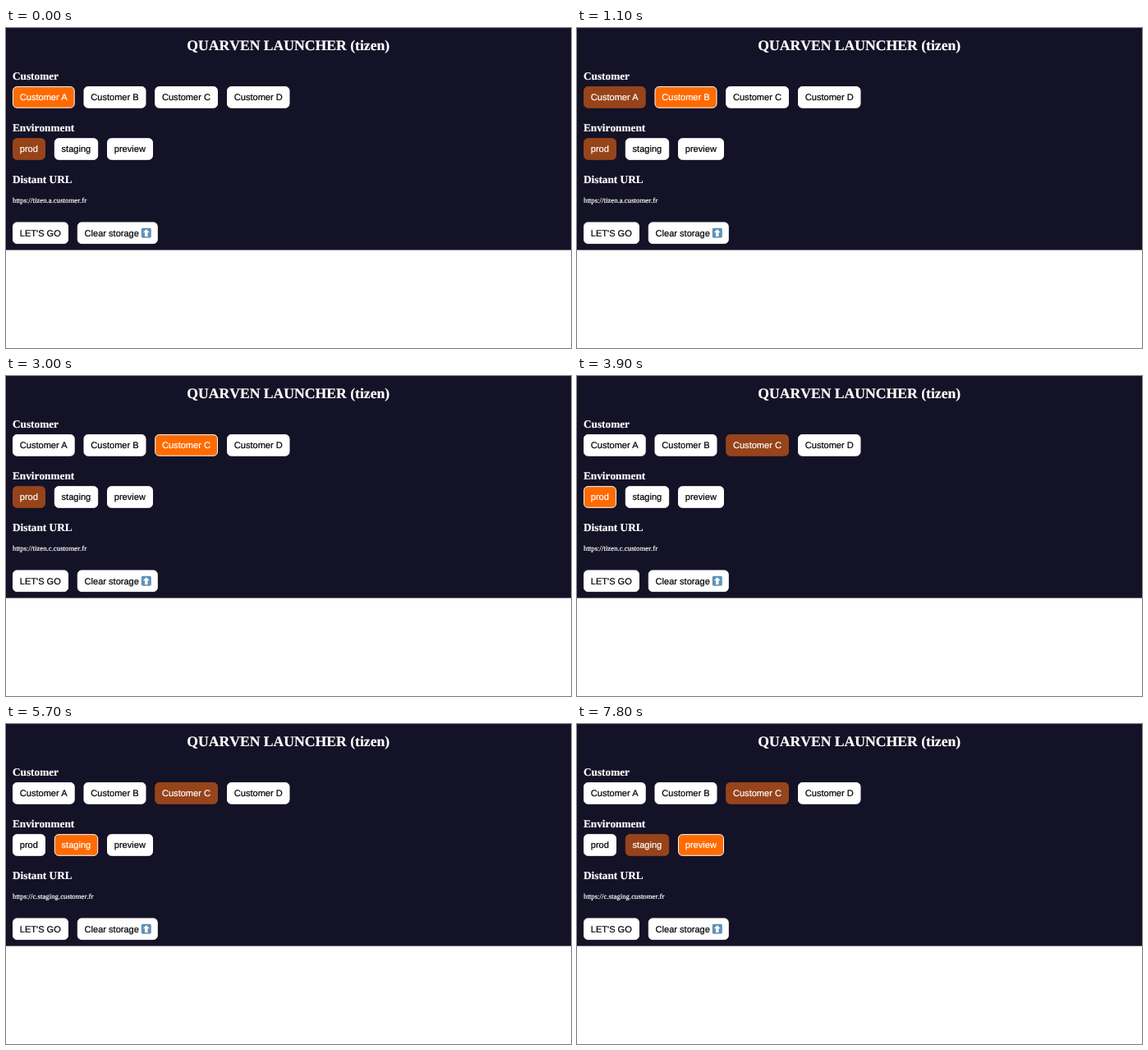
These frames come from a looping animation (688 by 390 pixels, 8 s). An HTML page:

```html
<!DOCTYPE html>
<html lang="en">
<head>
<meta charset="utf-8">
<title>Launcher</title>
<style>
  html, body { margin: 0; width: 100%; height: 100%; overflow: hidden; background: #fff; }
  svg { display: block; width: 688px; height: 390px; }
  text {
    font-kerning: none; text-rendering: geometricPrecision;
    fill: #fff; stroke: #fff; stroke-width: 0.2px;
    font-family: "Liberation Serif", Times, serif;
  }
  .title { font-size: 17.65px; font-weight: bold; text-anchor: middle; }
  .heading { font-size: 13.27px; font-weight: bold; }
  .url { font-size: 8.8px; }
  .button rect { fill: #fff; stroke: #fff; }
  .button text { fill: #000; stroke: #000; font: 11.05px "Liberation Sans", Arial, sans-serif; }
  .selected rect { fill: #97441b; stroke: #97441b; }
  .focused rect { fill: #ff6b00; stroke: #fff; }
  .selected text, .focused text { fill: #fff; stroke: #fff; }
</style>
</head>
<body>
<svg viewBox="0 0 688 390">
  <rect width="688" height="270.6" fill="#141226"/>
  <text class="title" x="343.7" y="26.9">QUARVEN LAUNCHER (tizen)</text>
  <text class="heading" x="8" y="62.8">Customer</text>
  <text class="heading" x="8" y="125.7">Environment</text>
  <text class="heading" x="8" y="188.8">Distant URL</text>
  <text class="url" id="url" x="8" y="212.9"></text>
  <g id="buttons"></g>
  <!-- up arrow icon -->
  <g transform="translate(164.8 243.8)">
    <rect width="12" height="12" rx="1.8" fill="#5f90ba"/>
    <path d="M6 1.4L10 5.4H7.7V10.4H4.3V5.4H2z" fill="#fff"/>
  </g>
</svg>
<script>
const DURATION = 8000;
const SVG_NS = "http://www.w3.org/2000/svg";

// label, left, top, width
const layout = [
  ["Customer A", 8, 71, 75.7], ["Customer B", 94.5, 71, 76],
  ["Customer C", 181.2, 71, 76.8], ["Customer D", 269, 71, 76.5],
  ["prod", 8, 134.1, 40], ["staging", 58.8, 134.1, 53.4], ["preview", 123, 134.1, 56],
  ["LET'S GO", 8, 236.4, 68], ["Clear storage", 86.8, 236.4, 98]
];

// start time, focused button, selected buttons, address
const urlA = "https://tizen.a.customer.fr";
const urlC = "https://tizen.c.customer.fr";
const urlStaging = "https://c.staging.customer.fr";
const states = [
  [0, "Customer A", ["Customer A", "prod"], urlA],
  [1100, "Customer B", ["Customer A", "prod"], urlA],
  [2200, "Customer C", ["Customer A", "prod"], urlA],
  [2900, "Customer C", ["Customer C", "prod"], urlC],
  [3900, "prod", ["Customer C", "prod"], urlC],
  [4500, "staging", ["Customer C", "prod"], urlC],
  [5700, "staging", ["Customer C", "staging"], urlStaging],
  [6900, "preview", ["Customer C", "staging"], urlStaging]
];

function add(parent, tag, attributes) {
  const node = document.createElementNS(SVG_NS, tag);
  for (const name in attributes) node.setAttribute(name, attributes[name]);
  return parent.appendChild(node);
}

const url = document.getElementById("url");
const buttons = layout.map(([label, x, y, width]) => {
  const node = add(document.getElementById("buttons"), "g", { class: "button" });
  add(node, "rect", { x: x + 0.5, y: y + 0.6, width: width - 1, height: 25.6, rx: 4.7 });
  add(node, "text", { x: x + 8.8, y: y + 17.3 }).textContent = label;
  return { label, node };
});

let shown;
function draw(now) {
  const time = now % DURATION;
  const state = states.findLast(([start]) => start <= time);
  if (state !== shown) {
    shown = state;
    const [, focused, selected, address] = state;
    url.textContent = address;
    for (const { label, node } of buttons) {
      node.classList.toggle("selected", selected.includes(label));
      node.classList.toggle("focused", label === focused);
    }
  }
}

const origin = performance.now();
function tick() {
  draw(performance.now() - origin);
  requestAnimationFrame(tick);
}
tick();
</script>
</body>
</html>
```
